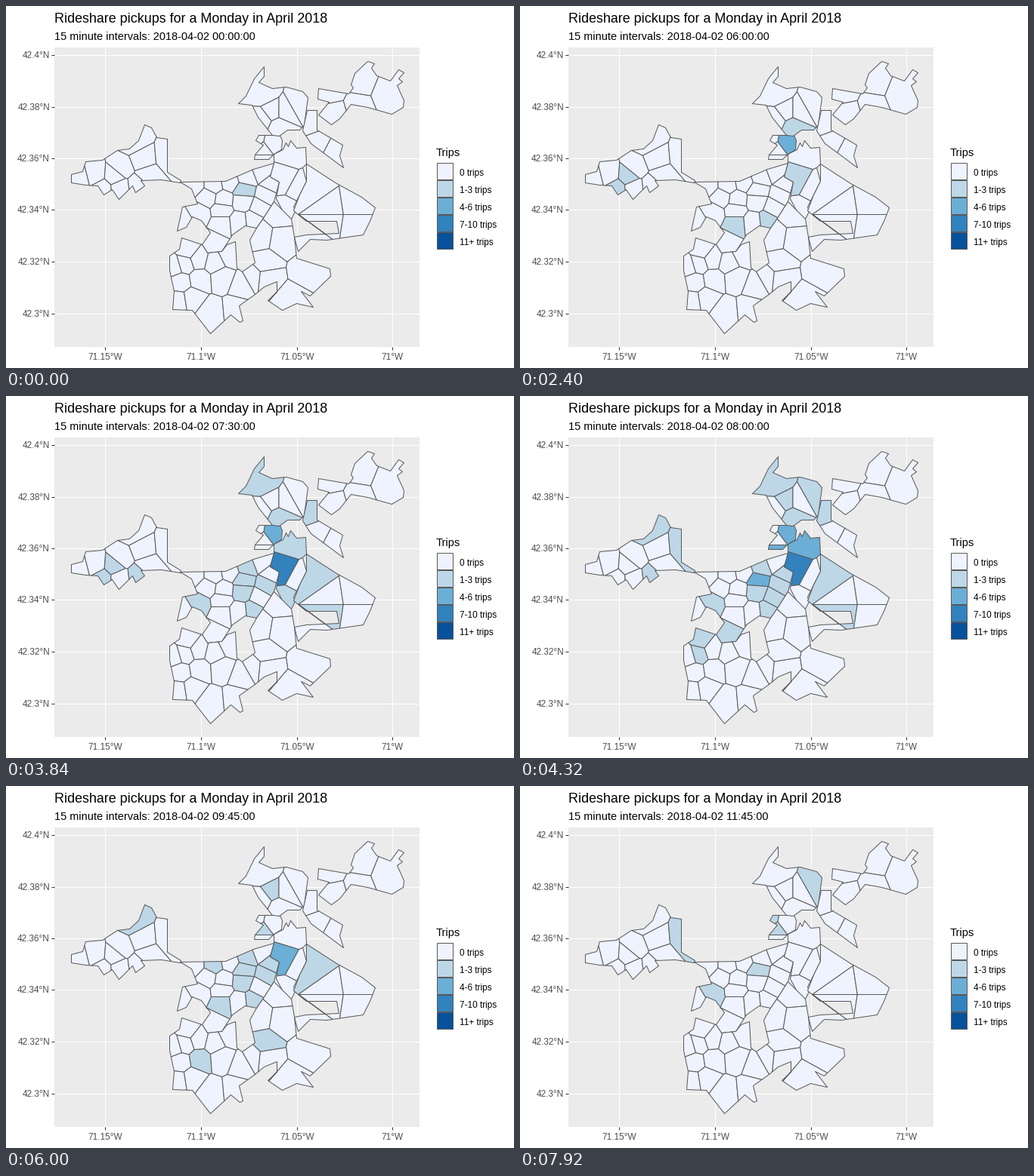
Animation of 672 by 480 pixels, one loop 8 s. Source, as a matplotlib script:

```python
import random

import matplotlib.pyplot as plt
from matplotlib.animation import FuncAnimation
from matplotlib.collections import PolyCollection
from matplotlib.patches import Rectangle

W, H, DPI = 672, 480, 96
STEP_FRAMES, INTERVAL, FRAMES = 3, 80, 100
BLUES = ["#EFF3FF", "#BDD7E7", "#6BAED6", "#3182BD", "#08519C"]
EDGE = "#595959"
PX = 72 / DPI

plt.rcParams["font.family"] = "Liberation Sans"
fig = plt.figure(figsize=(W / DPI, H / DPI), dpi=DPI, facecolor="white")
ax = fig.add_axes([0, 0, 1, 1])
ax.set_xlim(0, W)
ax.set_ylim(H, 0)
ax.axis("off")


def pairs(flat):
    return list(zip(flat[::2], flat[1::2]))


def clip(poly, p, q):
    """Keep the part of poly that lies nearer to p than to q."""
    nx, ny = q[0] - p[0], q[1] - p[1]
    mx, my = (p[0] + q[0]) / 2, (p[1] + q[1]) / 2
    side = [(x - mx) * nx + (y - my) * ny for x, y in poly]
    out = []
    for i, (x, y) in enumerate(poly):
        x0, y0 = poly[i - 1]
        a, b = side[i - 1], side[i]
        if (a > 0) != (b > 0):
            t = a / (a - b)
            out.append((x0 + t * (x - x0), y0 + t * (y - y0)))
        if b <= 0:
            out.append((x, y))
    return out


areas = {}


def land(key, coast, seeds):
    """Split a coast into the cells nearest to each seed point."""
    seeds = pairs(seeds)
    for i, p in enumerate(seeds):
        cell = pairs(coast)
        for q in seeds:
            if q != p:
                cell = clip(cell, p, q)
        if len(cell) > 2:
            areas[f"{key}{i}"] = [(x + .5, y + .5) for x, y in cell]


# western arm
land("W", [86, 234, 86, 223, 101, 219, 105, 206, 127, 204, 147, 191, 163, 189,
           175, 178, 183, 157, 192, 161, 199, 174, 213, 176, 213, 220,
           231, 231, 230, 234, 205, 230, 178, 231, 183, 238, 171, 247,
           167, 238, 149, 256, 140, 243, 129, 250, 121, 238, 105, 237],
     [97, 228, 117, 223, 143, 225, 127, 242, 150, 241, 174, 238,
      168, 180, 180, 203, 152, 214, 215, 200, 187, 224])
# river bank and the blocks south of it
land("S", [230, 233, 290, 232, 327, 216, 354, 208, 349, 226, 361, 233,
           354, 259, 340, 281, 331, 294, 316, 291, 299, 303, 285, 325,
           266, 327, 259, 316, 270, 300, 258, 284, 246, 279, 238, 293,
           226, 298, 233, 266, 253, 262, 245, 242],
     [313, 244, 317, 226, 338, 218, 352, 236, 345, 251, 312, 258, 336, 267,
      327, 284, 285, 288, 307, 286, 273, 313, 255, 274, 249, 237, 274, 237,
      287, 256, 266, 253, 235, 286, 296, 233, 285, 270])
# downtown and the small blocks beside it
land("D", [354, 196, 366, 190, 370, 181, 373, 186, 376, 178, 384, 188,
           396, 187, 397, 209, 392, 214, 397, 232, 380, 266, 382, 272,
           377, 282, 368, 276, 357, 255, 361, 233, 349, 226, 354, 208],
     [374, 198, 366, 224, 392, 238, 372, 276])
land("M", [334, 171, 362, 171, 365, 178, 364, 190, 354, 196, 347, 203,
           328, 203, 329, 197, 340, 184, 330, 178],
     [354, 181, 338, 193, 338, 201, 327, 176])
# eastern peninsula
land("P", [397, 209, 437, 235, 470, 253, 488, 267, 481, 285, 472, 303,
           424, 310, 402, 309, 386, 325, 381, 306, 397, 303, 440, 301,
           437, 285, 397, 285, 380, 271, 388, 250, 397, 232],
     [401, 240, 425, 278, 425, 274, 465, 284, 400, 312, 465, 268])
# north shore
land("C", [307, 129, 317, 119, 328, 96, 341, 80, 341, 93, 334, 101, 352, 109,
           370, 107, 392, 113, 399, 121, 394, 158, 388, 164, 372, 164,
           361, 172, 352, 171, 333, 147, 325, 131],
     [340, 117, 386, 130, 351, 139, 361, 160, 370, 139, 338, 149])
land("E", [398, 138, 411, 138, 411, 164, 445, 184, 441, 198, 446, 214,
           403, 182, 392, 165],
     [403, 155, 412, 180, 435, 192])
land("N", [413, 109, 453, 116, 459, 108, 456, 104, 461, 89, 478, 73, 487, 76,
           483, 82, 490, 92, 508, 99, 519, 84, 526, 88, 519, 96, 524, 100,
           517, 105, 526, 125, 525, 134, 510, 143, 478, 134, 456, 130,
           441, 149, 430, 157, 413, 144, 427, 127, 412, 123],
     [430, 115, 435, 140, 468, 100, 505, 115, 463, 132])
# south-east and south-west
land("R", [354, 259, 377, 282, 381, 306, 384, 334, 428, 348, 429, 358,
           402, 384, 390, 378, 406, 399, 384, 394, 365, 403, 346, 390,
           358, 379, 358, 365, 341, 372, 329, 382, 312, 352, 329, 340,
           322, 310, 331, 294, 340, 281],
     [335, 305, 362, 275, 365, 310, 342, 341, 398, 352, 378, 388,
      345, 360, 325, 358])
land("J", [216, 331, 229, 322, 232, 307, 259, 316, 266, 327, 285, 325,
           292, 316, 303, 312, 305, 347, 312, 352, 329, 382, 308, 397,
           313, 417, 309, 419, 297, 409, 270, 434, 246, 403, 220, 402,
           222, 378, 216, 350],
     [240, 324, 236, 341, 256, 362, 222, 345, 230, 366, 227, 390, 246, 387,
      270, 405, 285, 360, 275, 340, 295, 330, 312, 370, 304, 402, 254, 335])

# busy areas at key steps; each group is one trip level higher
BUSY = {
    0: ["S0"],
    6: ["S7 J1"],
    14: ["W2 W3 W5 C3 D0 D1 D3 P0 P1 S0 S1 S8 S7", "M0"],
    18: ["W6 W9 W5 C0 C1 C2 C3 E0 P0 P1 S11 S1 S3 S4 S5 S6 S7 S10 J0 J1",
         "M0 M2 D0 S0", "D1"],
    22: ["W6 W4 C2 M1 S0 S1 S3 S4 S5 S6 S7 S8 R3 J2 S13 P0", "D0 D1"],
    29: ["C2 C3 D1 S0 S12 S11"],
    33: ["C1 M1 M3 W9 S0 S11"],
}
# the first night steps skip empty intervals
NIGHT = [0, 15, 45, 90, 255, 285]


def known(step):
    return {n: lv for lv, group in enumerate(BUSY[step], 1)
            for n in group.split()}


def levels(step):
    """Each area moves from one key level to the next at its own moment."""
    a = max(k for k in BUSY if k <= step)
    b = min(k for k in BUSY if k >= step)
    before, after = known(a), known(b)
    mix = (step - a) / max(b - a, 1)
    rng = random.Random(a)
    return [(after if rng.random() < mix else before).get(n, 0) for n in areas]


def clock(step):
    m = NIGHT[step] if step < len(NIGHT) else 300 + 15 * (step - len(NIGHT))
    return f"15 minute intervals: 2018-04-02 {m // 60:02d}:{m % 60:02d}:00"


def line(x0, y0, x1, y1, color):
    ax.plot([x0, x1], [y0, y1], color=color, lw=PX, solid_capstyle="butt",
            zorder=1)


def label(x, y, text, size, color="black", ha="left"):
    return ax.text(x, y, text, fontsize=size, color=color, ha=ha,
                   va="baseline")


# panel, grid and axis labels
ax.add_patch(Rectangle((64, 55), 483, 397, fc="#EBEBEB", ec="none", zorder=0))
for i in range(4):
    x = round(131 + 126.8 * i)
    line(x, 55, x, 452, "white")
    line(x, 452, x, 456, "#333333")
    label(x, 469, f"{71.15 - .05 * i:.4g}°W", 8.8, "#4D4D4D", "center")
for i in range(6):
    y = round(65 + 68.5 * i)
    line(64, y, 547, y, "white")
    line(60, y, 64, y, "#333333")
    label(58, y + 4, f"{42.4 - .02 * i:.4g}°N", 8.8, "#4D4D4D", "right")

# legend
label(569, 199, "Trips", 11)
for i, t in enumerate(["0", "1-3", "4-6", "7-10", "11+"]):
    y = 208 + 23 * i
    ax.add_patch(Rectangle((570, y), 21, 22, fc=BLUES[i], ec=EDGE, lw=PX))
    label(600, y + 17, t + " trips", 8.8)

label(64, 22, "Rideshare pickups for a Monday in April 2018", 13.45)
stamp = label(64, 45, "", 10.84)
regions = PolyCollection(list(areas.values()), edgecolors=EDGE,
                         linewidths=PX, snap=False, zorder=2)
ax.add_collection(regions, autolim=False)


def draw(frame):
    step = frame // STEP_FRAMES
    regions.set_facecolor([BLUES[lv] for lv in levels(step)])
    stamp.set_text(clock(step))
    return regions, stamp


anim = FuncAnimation(fig, draw, frames=FRAMES, interval=INTERVAL, repeat=True)
plt.show()
```
